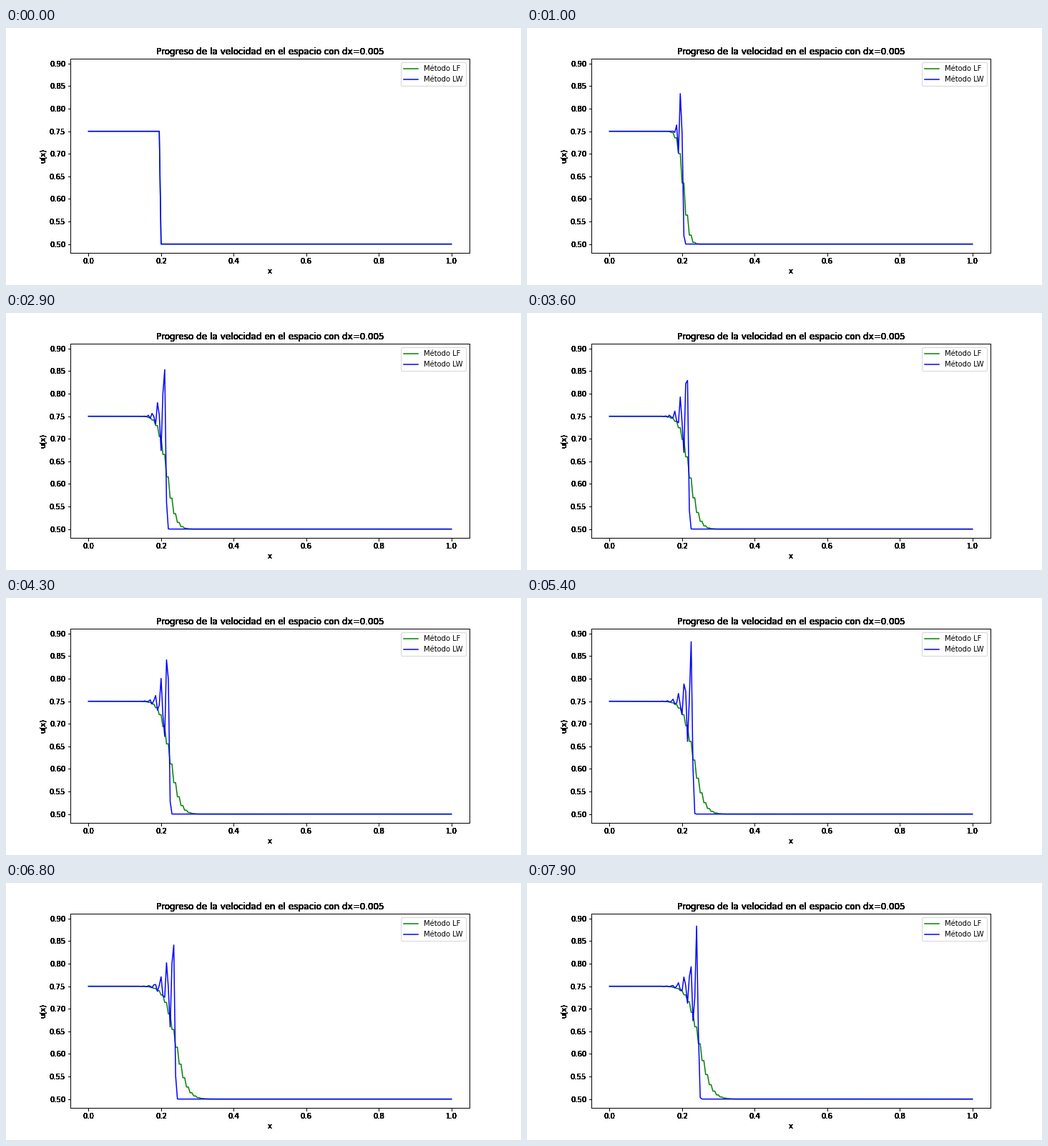
Recreate the animation shown at these times as a matplotlib script. Size 720 by 360 pixels, loop 8000 ms.

```python
import numpy as np
import matplotlib.pyplot as plt
from matplotlib.animation import FuncAnimation

FRAMES, INTERVAL = 80, 100
DX, DT = 0.005, 0.0025
LAM = DT / DX
LAYERS = 15  # overprinting that gives the axis text its heavy look

plt.rcParams.update({"font.family": "DejaVu Sans", "font.size": 10})


def flux(u):
    """Traffic flow written for the velocity u = 1 - density."""
    return u * (u - 1)


def lax_friedrichs(u):
    new = u.copy()
    f = flux(u)
    new[1:-1] = (u[2:] + u[:-2]) / 2 - LAM / 2 * (f[2:] - f[:-2])
    return new


def lax_wendroff(u):
    new = u.copy()
    half = (u[1:] + u[:-1]) / 2 - LAM / 2 * np.diff(flux(u))
    new[1:-1] -= LAM * np.diff(flux(half))
    return new


def solve(step, u):
    states = [u]
    for _ in range(FRAMES - 1):
        states.append(step(states[-1]))
    return states


def overprint(artist):
    draw = artist.draw

    def layered(renderer):
        for _ in range(LAYERS):
            draw(renderer)

    artist.draw = layered


x = np.linspace(0, 1, 201)
start = np.where(np.arange(x.size) < 40, 0.75, 0.5)
lf = solve(lax_friedrichs, start)
lw = solve(lax_wendroff, start)

fig = plt.figure(figsize=(10, 5), dpi=72, facecolor="white")
fig.subplots_adjust(left=0.125, right=0.9, bottom=0.125, top=0.88)
ax = fig.add_subplot()
line_lf, = ax.plot(x, start, color="g", lw=1.5, label="Método LF")
line_lw, = ax.plot(x, start, color="b", lw=1.5, label="Método LW")

low, high = 0.5, 0.891
pad = 0.05 * (high - low)
ax.set_xlim(-0.05, 1.05)
ax.set_ylim(low - pad, high + pad)
ax.set_xticks(np.linspace(0, 1, 6))
ax.set_yticks(np.linspace(0.5, 0.9, 9))
ax.set_title("Progreso de la velocidad en el espacio con dx=0.005", fontsize=12)
ax.set_xlabel("x")
ax.set_ylabel("u(x)")
ax.legend(loc="upper right")

ticks = ax.xaxis.get_major_ticks() + ax.yaxis.get_major_ticks()
for artist in [ax.title, ax.xaxis.label, ax.yaxis.label,
               *ax.spines.values(),
               *(t.label1 for t in ticks), *(t.tick1line for t in ticks)]:
    overprint(artist)


def update(i):
    line_lf.set_ydata(lf[i])
    line_lw.set_ydata(lw[i])
    return line_lf, line_lw


anim = FuncAnimation(fig, update, frames=FRAMES, interval=INTERVAL,
                     repeat=True, repeat_delay=0, blit=False)
plt.show()
```
